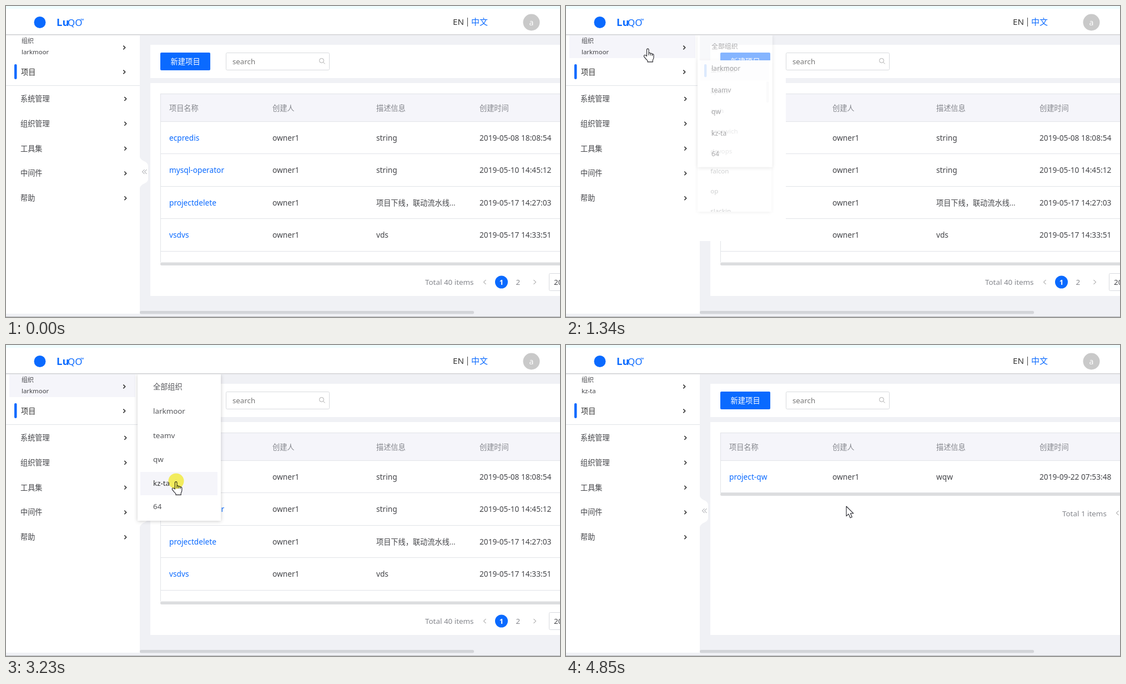
Write an HTML page with a canvas that moves like this. It is 998x561 px and loops after 5.48 s.

```html
<!DOCTYPE html>
<html lang="zh">
<head>
<meta charset="utf-8">
<title>Project console</title>
<style>
html, body { margin: 0; width: 100%; height: 100%; overflow: hidden; background: #fff; }
canvas { display: block; width: 998px; height: 561px; }
</style>
</head>
<body>
<canvas id="stage" width="998" height="561"></canvas>
<script>
const ctx = document.getElementById('stage').getContext('2d');
const LOOP = 5480;
const FONT = '"Noto Sans", "Noto Sans CJK SC", "Noto Sans CJK", sans-serif';
const BLUE = '#0a6aff', GREY = '#f0f1f5', HOVER = '#f5f5fa', LINE = '#e1e3e8', INK = '#444549', MUTED = '#85878d';

// First change, last change and number of changes for each burst.
const BURSTS = [[330, 800, 7], [890, 1110, 4], [1190, 1430, 4], [1500, 1580, 2], [1740, 2200, 7],
  [2300, 2830, 8], [2900, 2900, 1], [3230, 3230, 1], [3440, 3590, 3], [3680, 3760, 2],
  [4000, 4230, 4], [4330, 4540, 4], [4610, 4850, 4]];
const STEPS = [0];
for (const [from, to, count] of BURSTS)
  for (let i = 0; i < count; i++)
    STEPS.push(count > 1 ? Math.round((from + (to - from) * i / (count - 1)) / 10) * 10 : from);

// Pointer hot spot: time, x, y.
const PATH = [[330, 768, 537], [800, 224, 184], [890, 195, 118], [1110, 148, 82], [1430, 147, 71],
  [1580, 147, 71], [1740, 153, 76], [2200, 292, 114], [2300, 293, 120], [2830, 304, 246], [2900, 307, 246],
  [3440, 306, 246], [3760, 306, 246], [4000, 302, 240], [4160, 314, 218], [4230, 328, 220],
  [4540, 376, 261], [4850, 504.5, 290.5]];

const ORG_MENU = { x: 237, y: 52, w: 150, h: 265, textX: 265,
  items: ['全部组织', 'larkmoor', 'teamv', 'qw', 'kz-ta', '64'], ys: [75, 119, 163, 206, 249, 291] };
const PROJECT_MENU = { x: 237, y: 98, w: 154, h: 315, textX: 264, bar: true,
  items: ['全部项目', 'apaas', 'arch', 'greewich', 'devops', 'falcon', 'op', 'slackin'],
  ys: [118, 162, 203, 245, 287, 329, 370, 412] };

const COLUMNS = [294, 480, 667, 853];
const ROWS = [
  ['ecpredis', 'owner1', 'string', '2019-05-08 18:08:54'],
  ['mysql-operator', 'owner1', 'string', '2019-05-10 14:45:12'],
  ['projectdelete', 'owner1', '项目下线，联动流水线...', '2019-05-17 14:27:03'],
  ['vsdvs', 'owner1', 'vds', '2019-05-17 14:33:51']];
const NEW_ROWS = [['project-qw', 'owner1', 'wqw', '2019-09-22 07:53:48']];

const clamp = v => Math.max(0, Math.min(1, v));
const ramp = (t, a, b) => clamp((t - a) / (b - a));

function box(x, y, w, h, color) {
  ctx.fillStyle = color;
  ctx.fillRect(x, y, w, h);
}

function pill(x, y, w, h, r, color) {
  ctx.fillStyle = color;
  ctx.beginPath();
  ctx.roundRect(x, y, w, h, r);
  ctx.fill();
}

function frame(x, y, w, h) {
  ctx.strokeStyle = '#d8dade';
  ctx.lineWidth = 1;
  ctx.beginPath();
  ctx.roundRect(x + 0.5, y + 0.5, w, h, 2);
  ctx.stroke();
}

function disc(x, y, r, color) {
  ctx.fillStyle = color;
  ctx.beginPath();
  ctx.arc(x, y, r, 0, 7);
  ctx.fill();
}

// Text placed by its left edge and vertical middle.
function label(text, x, y, color = INK, size = /[\u4e00-\u9fff]/.test(text) ? 13.2 : 13.7, weight = 400) {
  ctx.font = `${weight} ${size}px ${FONT}`;
  ctx.fillStyle = color;
  ctx.fillText(text, x, y + size * 0.36);
}

function chevron(x, y, dir = 1, size = 3.4, color = '#333', width = 1.6) {
  ctx.strokeStyle = color;
  ctx.lineWidth = width;
  ctx.beginPath();
  ctx.moveTo(x - dir * size / 2, y - size);
  ctx.lineTo(x + dir * size / 2, y);
  ctx.lineTo(x - dir * size / 2, y + size);
  ctx.stroke();
}

function faded(alpha, draw) {
  if (alpha <= 0) return;
  ctx.save();
  ctx.globalAlpha = alpha;
  draw();
  ctx.restore();
}

function drawHeader() {
  box(0, 0, 998, 52, '#fff');
  box(0, 0, 998, 5, '#f0fdfe');
  box(0, 51, 998, 1, '#cfd0d2');
  box(0, 52, 998, 1, '#e4e5e8');
  disc(61, 29.5, 10.5, BLUE);
  label('Lu', 91, 29.5, BLUE, 18.5, 700);
  label('QO', 111, 29.5, BLUE, 17, 300);
  label('™', 134, 26, BLUE, 8.5);
  label('EN', 805, 28.5, '#333', 15.2);
  box(831, 21, 1, 16, '#444');
  label('中文', 838, 28.5, BLUE, 15);
  disc(946.5, 29.5, 15, '#c9c9c9');
  label('a', 942.5, 30, '#fff', 14);
}

function drawSidebar(t) {
  box(0, 52, 241, 503, '#fff');
  const orgHover = Math.min(ramp(t, 1050, 1190), 1 - ramp(t, 3440, 3690));
  const projectHover = Math.min(ramp(t, 800, 970), 1 - ramp(t, 1110, 1270));
  faded(orgHover, () => box(6, 53, 227, 41, HOVER));
  faded(projectHover, () => box(6, 98, 227, 41, HOVER));
  label('组织', 28, 63, INK, 11);
  label(t < 3510 ? 'larkmoor' : 'kz-ta', 28, 83, INK, 11.4);
  pill(15, 105, 4.5, 27, 2, BLUE);
  label('项目', 27, 119, '#333');
  chevron(213, 75);
  chevron(213, 119);
  box(0, 143, 241, 1, LINE);
  ['系统管理', '组织管理', '工具集', '中间件', '帮助'].forEach((name, i) => {
    label(name, 26, 167 + i * 44.9);
    chevron(215, 167.5 + i * 44.8);
  });
  ctx.fillStyle = '#fff';
  ctx.fill(new Path2D('M241 272C243 281 256 279 256 289V312C256 321 243 319 241 329Z'));
  chevron(247.5, 299, -1, 4, '#909298', 1);
  chevron(251.5, 299, -1, 4, '#909298', 1);
}

function drawToolbar() {
  box(260, 70, 738, 60, '#fff');
  pill(278, 84, 90, 32, 2, BLUE);
  label('新建项目', 296.5, 100, '#fff', 13.3);
  frame(396, 84, 186, 31);
  label('search', 408, 100, '#777', 13.3);
  ctx.strokeStyle = '#aaa';
  ctx.lineWidth = 1;
  ctx.beginPath();
  ctx.arc(568.5, 98.5, 4, 0, 7);
  ctx.moveTo(571.5, 101.5);
  ctx.lineTo(574.5, 104.5);
  ctx.stroke();
}

function drawTable(rows, bottom, hovered) {
  box(260, 139, 738, 384, '#fff');
  box(278, 158, 720, 51, HOVER);
  box(278, 158, 720, 1, LINE);
  box(278, 208, 720, 1, LINE);
  if (hovered) box(279, 209, 187, 57, HOVER);
  ['项目名称', '创建人', '描述信息', '创建时间'].forEach((name, i) => label(name, COLUMNS[i], 184, MUTED));
  rows.forEach((row, i) => {
    const y = 238 + i * 58.4;
    row.forEach((cell, c) => label(cell, COLUMNS[c], y, c ? INK : BLUE));
    box(278, Math.round(266 + i * 58.5), 720, 1, LINE);
  });
  box(278, 158, 1, bottom - 158, LINE);
  pill(278, bottom, 724, 5.5, 2.5, '#dcdddf');
}

function drawPager() {
  label('Total 40 items', 755, 498, MUTED, 13.4);
  chevron(862.5, 498, -1, 4, '#888', 1);
  disc(892.5, 498, 11.5, BLUE);
  label('1', 888.7, 498, '#fff', 13, 700);
  label('2', 918.5, 498, MUTED, 13.4);
  chevron(952.5, 498, 1, 4, '#888', 1);
  frame(978, 482, 40, 31);
  label('20', 987, 498, INK, 13.4);
}

function drawLoading(t) {
  box(260, 139, 738, 379, '#fff');
  box(260, 518, 18, 7, '#e8e9ed');
  pill(260, 526, 742, 5.5, 2.5, '#d5d6da');
  const turn = (t - 3590) / 1200 * Math.PI * 2 + 0.12;
  for (let i = 0; i < 4; i++) {
    const a = turn + i * Math.PI / 2;
    disc(743 + 7 * Math.cos(a), 347.5 + 7 * Math.sin(a), 3.5, '#b2dcff');
  }
}

// The shadow is kept outside the panel so that it cannot show through a faded one.
function drawShadow({ x, y, w, h }) {
  ctx.save();
  ctx.beginPath();
  ctx.rect(x - 20, y - 20, w + 40, h + 40);
  ctx.rect(x, y, w, h);
  ctx.clip('evenodd');
  ctx.shadowColor = 'rgba(0,0,0,.2)';
  ctx.shadowBlur = 7;
  ctx.shadowOffsetY = 1;
  box(x, y, w, h, '#fff');
  ctx.restore();
}

function drawMenu(menu, alpha, scale, pointerY) {
  faded(alpha, () => {
    const { x, y, w, h } = menu;
    ctx.translate(236, y);
    ctx.scale(scale, scale);
    ctx.translate(-236, -y);
    drawShadow(menu);
    box(x, y, w, h, '#fff');
    ctx.beginPath();
    ctx.rect(x, y, w, h);
    ctx.clip();
    if (menu.bar) {
      box(243, 98, 143, 42, HOVER);
      pill(251, 106, 5, 27, 2, '#3680fa');
      pill(380, 142, 5.5, 44, 2.5, '#e4e4e6');
    }
    menu.items.forEach((item, i) => {
      const on = Math.abs(pointerY - menu.ys[i]) < 21;
      if (on) box(242, menu.ys[i] - 20, 139, 42, HOVER);
      label(item, menu.textX, menu.ys[i], on ? '#333' : menu.bar ? '#707276' : '#55565a', i ? 13.4 : 13.2);
    });
  });
}

function drawMenus(t, pointer) {
  // The closing panels leave a white patch that clears late.
  if (t >= 970 && t < 1430) box(237, 98, 159, 326, '#fff');
  else if (t >= 1430 && t < 1500) box(241, 158, 155, 266, '#fff');
  else if (t >= 1500 && t < 1580) box(241, 318, 155, 106, '#fff');
  if (t >= 3440 && t < 3680) box(236, 53, 151, 264, '#fff');

  const projectOut = ramp(t, 1110, 1350);
  if (t >= 890) drawMenu(PROJECT_MENU, ramp(t, 800, 1050) * (1 - projectOut),
    (0.8 + 0.2 * ramp(t, 800, 1050)) * (1 - 0.2 * projectOut), -99);

  const opening = ramp(t, 1110, 1430), closing = ramp(t, 3360, 3620);
  const hoverY = t >= 1740 && t < 3440 && pointer.x > 237 ? pointer.y : -99;
  drawMenu(ORG_MENU, opening * (1 - closing), (0.8 + 0.2 * opening) * (1 - 0.19 * closing), hoverY);
}

const HAND = new Path2D('M6 14V2.5Q6 .6 7.8 .6Q9.6 .6 9.6 2.5V8.3Q11.8 7.2 12.8 9.1Q15 8.2 15.8 10.2' +
  'Q18.5 9.6 18.5 12.6V16Q18.5 18.7 16.8 21V24.4H7.5V22.2Q4.5 19.5 1 14.6Q.4 12.6 2 12Q4 11.6 6 14Z');
const KNUCKLES = new Path2D('M9.6 8.3V12.6M12.8 9.1V12.8M15.8 10.2V13.4');
const ARROW = new Path2D('M.5 .5V18.2L4.6 14.4L7.6 21.2L10.8 19.8L7.9 13.3H13.4Z');

function drawPointer(t, { x, y }) {
  const hand = t < 3440 && x < 241 || t >= 1740 && t < 3440;
  ctx.save();
  ctx.translate(hand ? x - 8 : x, y);
  ctx.fillStyle = '#fff';
  ctx.strokeStyle = '#26262c';
  ctx.lineWidth = 1.1;
  ctx.lineJoin = 'round';
  ctx.fill(hand ? HAND : ARROW);
  ctx.stroke(hand ? HAND : ARROW);
  if (hand) ctx.stroke(KNUCKLES);
  ctx.restore();
}

function drawClick() {
  ctx.save();
  ctx.globalCompositeOperation = 'multiply';
  disc(306.5, 245.5, 14, '#fcf660');
  ctx.restore();
}

function pointerAt(t) {
  const i = PATH.findIndex(p => p[0] >= t);
  if (i <= 0) {
    const [, x, y] = PATH[i < 0 ? PATH.length - 1 : 0];
    return { x, y };
  }
  const [t0, x0, y0] = PATH[i - 1], [t1, x1, y1] = PATH[i];
  const k = (t - t0) / (t1 - t0);
  return { x: x0 + (x1 - x0) * k, y: y0 + (y1 - y0) * k };
}

function render(t) {
  const pointer = pointerAt(t);
  box(0, 0, 998, 561, GREY);
  drawToolbar();
  if (t < 3510) {
    drawTable(ROWS, 462.5);
    drawPager();
  } else if (t < 3760) {
    drawLoading(t);
  } else {
    drawTable(NEW_ROWS, 266.5, t >= 4000 && pointer.y < 267);
    label('Total 1 items', 894, 304, MUTED, 13.4);
    chevron(993.5, 303, -1, 4, '#888', 1);
  }
  drawSidebar(t);
  pill(241, 550, 602, 5.5, 2.5, '#d3d5d9');
  box(0, 560, 998, 1, '#b4b6ba');
  drawMenus(t, pointer);
  drawHeader();
  if (t >= 330) drawPointer(t, pointer);
  if (t >= 3230 && t < 3440) drawClick();
}

const start = performance.now();
function tick() {
  const t = (performance.now() - start) % LOOP;
  render(STEPS.findLast(s => s <= t));
  requestAnimationFrame(tick);
}
tick();
</script>
</body>
</html>
```
